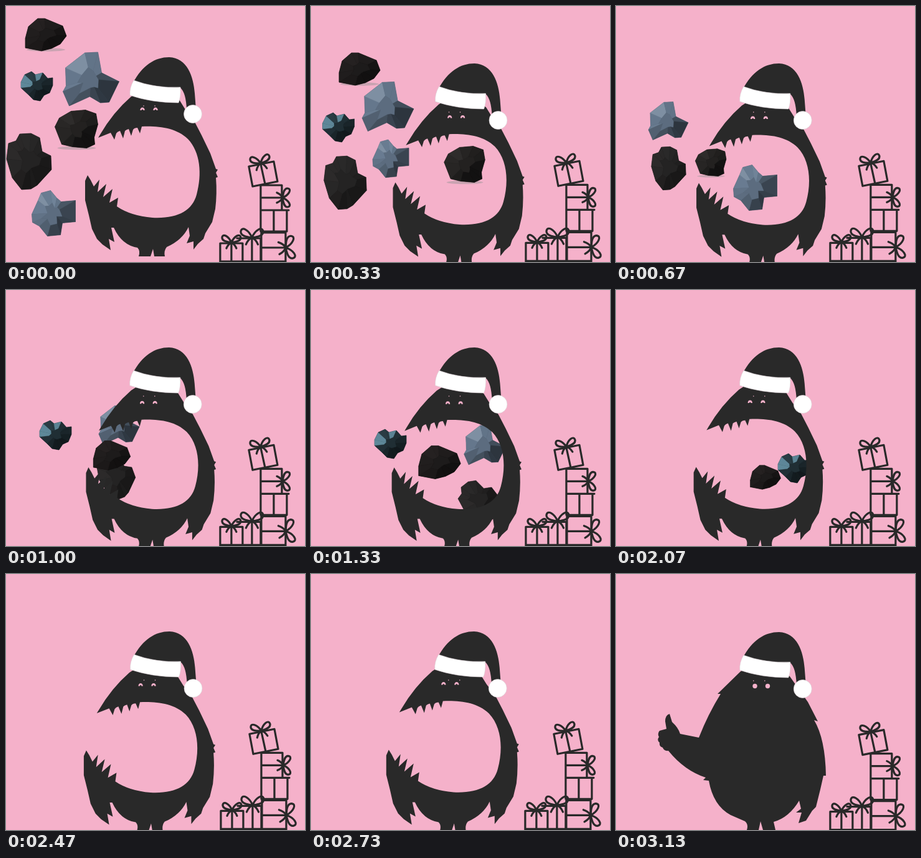
Animation of 480 by 410 pixels, one loop 3340 ms. Source, as an HTML page:

```html
<!DOCTYPE html>
<html lang="en">
<head>
<meta charset="utf-8">
<title>Hungry holiday monster</title>
<style>
  html, body { margin: 0; width: 100%; height: 100%; overflow: hidden; background: #f5b1ca; }
  svg { display: block; width: 100vw; height: 100vh; }
  .ink { fill: #292929; }
  .line { fill: none; stroke: #292929; stroke-width: 3.2; stroke-linejoin: round; stroke-linecap: round; }
  .pink { fill: #f5b1ca; }
  .fur { fill: #fff; stroke: #d9cdd2; stroke-width: .6; }
</style>
</head>
<body>
<svg viewBox="0 0 480 410">
  <g id="gifts"></g>
  <g id="rocks"></g>
  <g id="open">
    <path class="ink" d="M148 211 L151 206 Q172 170 201 145 L240 120 L278 150 L288 166 L302 184 L314 207
      L328 236 L337 261 L340 262 L337 267 L340 274 L337 275 Q339 300 336 325 L331 346 L320 364 L317 373 L308 381
      L301 390 L301 377 L290 380 L295 368 L293 354 Q283 375 258 386 Q253 392 255 401 L238 401 L236 389
      L232 401 L213 401 Q216 392 211 387 Q186 383 173 355 L169 355 L174 378 L165 373 L168 391 L155 382
      L146 373 L138 357 L133 335 L127 311 L127 280 L131 271 L136 279 L141 289 L150 278 L147 298 L161 285
      L156 306 L171 293 L166 315 L180 307 L178 321 Q200 336 235 339 C275 341 299 328 306 302
      C315 269 312 234 292 213 C273 195 246 192 218 193 L215 204 L211 195 Q206 195 204 198 L201 208
      L197 197 Q193 198 191 200 L188 212 L183 200 Q179 201 177 204 L174 214 L168 203 Z"/>
    <g class="pink" id="lids"></g>
  </g>
  <g id="closed">
    <path class="ink" d="M200 156 L163 192 L168 192 Q148 224 133 262 L103 256 Q100 246 90 237 L86 224
      Q79 226 79 236 L81 248 L70 251 Q66 255 69 261 Q65 266 70 270 Q69 276 75 278 Q77 284 84 283
      Q110 315 144 326 L140 330 L149 331 Q156 371 184 386 L207 396 Q213 401 210 410 L229 410 L232 396
      L236 410 L256 410 L253 397 Q278 390 294 363 L297 376 L289 382 L298 382 L293 399 L305 395 L315 379
      L321 373 L328 345 L333 323 L337 323 Q336 264 318 234 L324 236 L308 205 L279 164 L240 135 Z"/>
    <g class="pink"><circle cx="223" cy="179.500" r="3.700"/><circle cx="243.500" cy="179.500" r="3.700"/></g>
  </g>
  <g id="hat">
    <path class="ink" d="M204 123 C219 95 239 82 262 82 C291 83 301 113 303 140 L305 166 L290 166
      Q289 139 280 131 L278 145 L206 139 Z"/>
    <path class="fur" d="M205 119 Q240 132 280 130 Q281 146 277 155 Q234 155 199 143 Q198 131 205 119 Z"/>
    <circle class="fur" cx="300" cy="173" r="14.500"/>
    <g class="pink"><circle cx="221" cy="160" r=".8"/><circle cx="239" cy="160" r=".8"/></g>
  </g>
</svg>
<script>
const $ = id => document.getElementById(id);
const mix = (a, b, t) => a + (b - a) * t;

$("lids").innerHTML = [219, 240].map(x =>
  `<path d="M${x - 3.7} 167a3.700 4.600 0 0 1 7.400 0h-2.300a1.400 1.500 0 0 0-2.800 0z"/>`).join("");

// Gifts: outlines plus one reusable bow.
const bow = (x, y, turn, size) => `<path class="line" vector-effect="non-scaling-stroke"
  transform="translate(${x} ${y}) rotate(${turn}) scale(${size})"
  d="M0 0C-4-10-14-16-15-8C-15-2-6-1 0 0C4-10 14-16 15-8C15-2 6-1 0 0Q-5 2-8 9M0 0Q5 2 8 9"/>`;

$("gifts").innerHTML = `<path class="line" d="M390 257L430 249L436 281L396 289ZM409 253L416 285
  M409 287H443V327H409ZM409 307H443M409 327H451V361H409ZM430 327V361M451 327H454
  M410 363H449V410H410ZM410 387H449M371 372H409V410M395 372V410
  M344 380H380V410H344ZM362 380V410M344 409H449"/>`
  + bow(409, 252, -10, 1.05) + bow(444, 307, 90, 1) + bow(449, 387, 85, 1.2)
  + bow(395, 371, 0, 1.2) + bow(362, 379, 0, 1);

function seeded(seed) {
  return () => {
    seed = (seed * 16807) % 2147483647;
    return seed / 2147483647;
  };
}

// Outlines are drawn around the rock's own centre; tint is hue, saturation, darkest and lightest.
const rocks = {
  coal: { tint: [0, 5, 5, 15], shadow: 24,
    outline: "-33,6 -28,-13 -13,-26 -2,-26 27,-14 33,2 23,15 9,22 -7,26 -33,21" },
  teal: { tint: [198, 24, 8, 22], glint: 28,
    outline: "-26,-6 -20,-18 -9,-23 -3,-18 9,-21 17,-12 25,-13 25,-1 20,11 11,15 5,24 -6,22 -14,14 -26,3" },
  slate: { tint: [212, 16, 20, 58],
    outline: "-45,20 -40,11 -41,-18 -10,-42 11,-43 17,-10 45,4 29,37 15,38 -2,28 -35,43" },
  lump: { tint: [20, 4, 6, 18], shadow: 30,
    outline: "-35,-4 -28,-18 -9,-29 14,-31 31,-25 34,-8 28,13 29,24 16,30 -7,28 -24,24" },
  boulder: { tint: [0, 2, 8, 18],
    outline: "-36,-4 -33,-29 -21,-33 -15,-44 3,-45 17,-38 21,-16 35,-9 36,13 13,38 3,44 -12,45 -27,26" },
  block: { tint: [212, 16, 20, 58],
    outline: "-35,2 -25,-20 -20,-32 -5,-36 5,-24 12,-18 35,-20 35,14 14,16 11,35 -10,37 -23,21 -34,15" }
};

// Facets run from the rim to a jittered core and brighten towards the upper left.
function drawRock({ tint: [hue, sat, dark, light], glint = 0, shadow, outline }, seed) {
  const random = seeded(seed);
  const rim = outline.split(" ").map(p => p.split(",").map(Number));
  const core = rim.map(([x, y]) => {
    const depth = mix(.25, .6, random());
    return [x * depth, y * depth];
  });
  const face = (points, level) => {
    const tone = `hsl(${hue} ${sat}% ${mix(dark, light, level)}%)`;
    return `<polygon points="${points.join(" ")}" fill="${tone}" stroke="${tone}" stroke-width=".4"/>`;
  };
  const facets = rim.map((point, k) => {
    const next = (k + 1) % rim.length;
    const x = point[0] + rim[next][0], y = point[1] + rim[next][1];
    const facing = -(x * .7 + y * .7) / Math.hypot(x, y);
    const shine = random() > .75 ? glint / (light - dark) : 0;
    return face([point, rim[next], core[next], core[k]], .5 + .4 * facing + .2 * (random() - .5) + shine);
  });
  return (shadow ? `<ellipse class="shadow" fill="#c9a3b1" cy="${shadow}" rx="31" ry="2.800"/>` : "")
    + face(rim, .4) + facets.join("") + face(core, .6);
}

// Each trip is a rock with a few stops: step, x, y, size, turn. It is seen from its first stop to its last.
const trips = [
  ["coal", [0, 64, 46], [1, 78, 101]],
  ["teal", [0, 50, 128], [1, 44.5, 194]],
  ["lump", [0, 113.5, 197.5], [1, 247, 254, .95], [2, 152.5, 251, .72]],
  ["block", [0, 76.5, 331.5], [1, 128, 244, .83], [2, 223.5, 290.5]],
  ["slate", [0, 136.5, 117], [1, 123.5, 161, .92], [2, 84, 184, .71], [4, 279, 248, .74], [5, 288, 303, .74, -18]],
  ["boulder", [0, 37, 249], [1, 55, 283, .95], [2, 84.5, 260, .77], [4, 271, 338, .8, -35], [5, 230, 351, .8, -35]],
  ["coal", [3, 170, 265, .9], [4, 206.5, 276, 1.02], [5, 216, 267, .74], [6, 240, 300, .74]],
  ["teal", [3, 80, 232], [4, 128, 246], [6, 286, 285]]
].map(([name, ...stops], i) => {
  const el = document.createElementNS("http://www.w3.org/2000/svg", "g");
  el.innerHTML = drawRock(rocks[name], 4001 + name.length * 977);
  $("rocks").append(el);
  return { el, stops: stops.map(([step, x, y, size = 1, turn = 0]) => [step, x, y, size, turn]) };
});

function place({ el, stops }, step) {
  const next = stops.findIndex(stop => stop[0] >= step);
  const seen = next >= 0 && stops[0][0] <= step;
  el.style.display = seen ? "" : "none";
  if (!seen) return;
  const to = stops[next], from = stops[Math.max(next - 1, 0)];
  const part = to === from ? 0 : (step - from[0]) / (to[0] - from[0]);
  const [, x, y, size, turn] = from.map((value, k) => mix(value, to[k], part));
  el.setAttribute("transform", `translate(${x} ${y}) rotate(${turn}) scale(${size})`);
  const shadow = el.querySelector(".shadow");
  if (shadow) shadow.style.display = step < 3 ? "" : "none";
}

const move = (id, x, y, size = 1) => $(id).setAttribute("transform",
  `translate(${x + 233} ${y + 400}) scale(${size}) translate(-233 -400)`);

const loop = 3340, stepsPerSecond = 3, lastStep = 9;

function pose(step) {
  const down = step > 0 ? 1 : 0, done = step === lastStep;
  const sway = Math.cos((step - 1) * 2 * Math.PI / 3);
  const squeeze = 1 - .022 * Math.sin(Math.PI * Math.min(step / 8, 1));
  move("open", down * (3.3 - 1.1 * step + 1.4 * sway), 10.5 * down, squeeze);
  move("hat", .5 * down * sway, 10 * down + (done ? 1 : 0));
  move("gifts", .2 + .7 * sway, done ? .6 : -.7 * down);
  $("open").style.display = done ? "none" : "";
  $("closed").style.display = done ? "" : "none";
  trips.forEach(trip => place(trip, step));
}

const start = performance.now();
let shown;
function tick() {
  const time = (performance.now() - start) % loop;
  const step = Math.min(lastStep, Math.floor((time + 4) * stepsPerSecond / 1000));
  if (step !== shown) pose(shown = step);
  requestAnimationFrame(tick);
}
tick();
</script>
</body>
</html>
```
